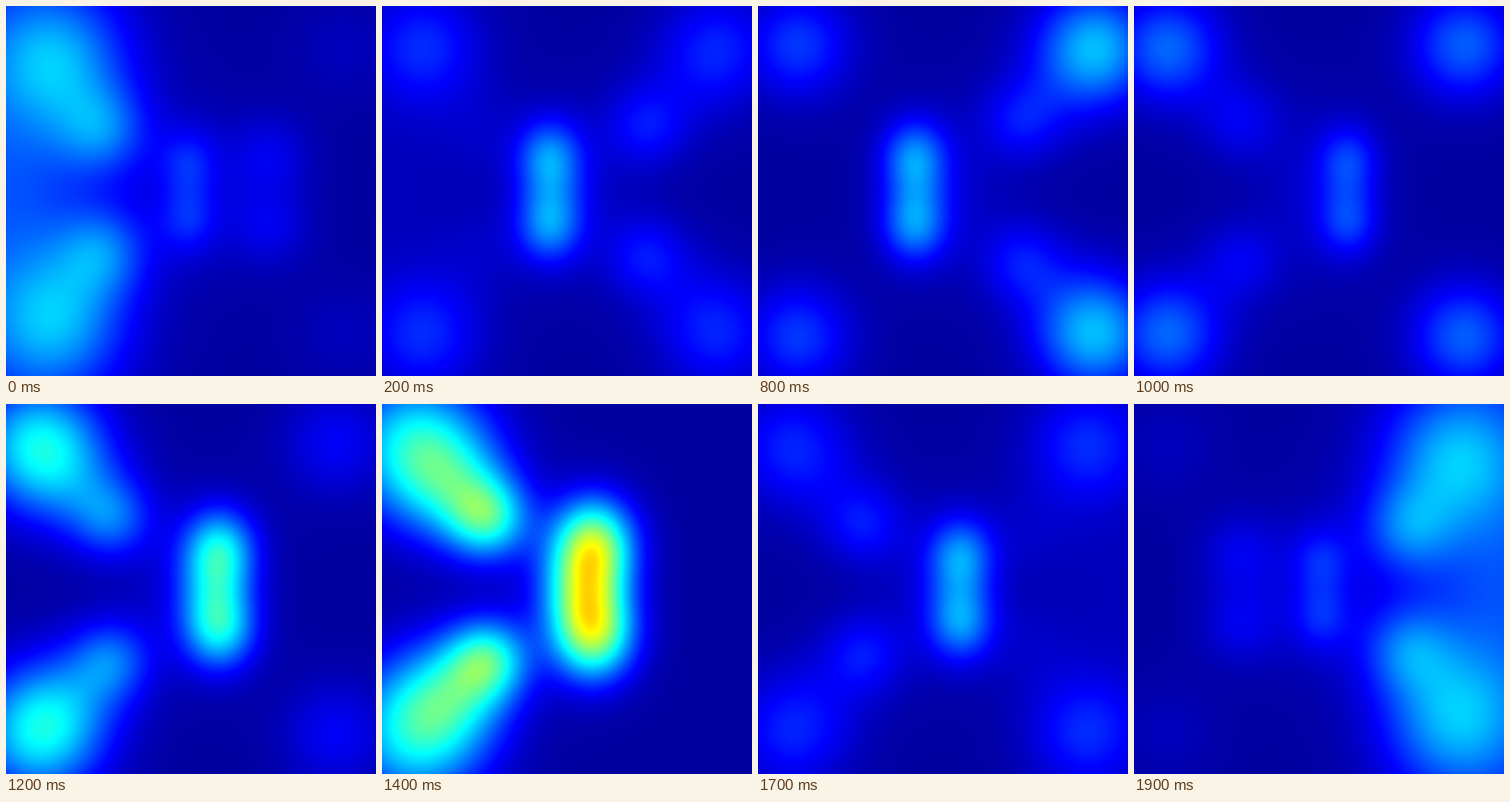
A matplotlib script that plays this animation: 376x376 px, repeating every 2000 ms.

```python
import numpy as np
import matplotlib.pyplot as plt
from matplotlib.animation import FuncAnimation

SIZE, DPI, FRAMES = 376, 100, 20
MID = (SIZE - 1) / 2
Y, X = np.mgrid[0:SIZE, 0:SIZE].astype(float)


def bell(x, centre, width):
    return np.exp(-((x - centre) / width) ** 2)


def lobe(height, x, y, wide, tall=None):
    """Soft round spot; y is measured from the mid line."""
    tall = tall or wide
    return (height * bell(X, x, wide * np.sqrt(2))
            * bell(Y, MID + y, tall * np.sqrt(2)))


def pair(height, x, y, wide, tall=None):
    return lobe(height, x, y, wide, tall) + lobe(height, x, -y, wide, tall)


def density(i):
    # The second half runs backwards as a mirror image
    if i >= FRAMES // 2:
        return density(FRAMES - 1 - i)[:, ::-1]

    fade = bell(i, 0, 1.5)      # opening glow on the left
    pulse = bell(i, 5, 2.93)    # bright core and arms
    late = bell(i, 6, 3.8)      # outer ends of the arms
    swing = np.cos(np.pi * i / (FRAMES / 2 - 0.5)) ** 2

    field = 0.03 + lobe(0.045, MID, 0, 45, 60)

    # Curved core
    x = 157 + 28 * np.exp(-i / 2.5)
    wide, tall = 20 + 9 * pulse, 24 + 9 * pulse
    field += pair(0.07 + 0.38 * pulse, x, 28 + 18 * pulse, wide, tall)
    field += lobe(0.27 * pulse ** 2, x + 10 * pulse, 0, wide, tall)

    # Diagonal arms on the right
    field += pair(0.07 + 0.25 * pulse ** 2, 268, 72 - 36 * fade, 29)
    field += pair(0.2 * pulse ** 2, 303, 105, 40)
    field += pair(0.36 * late, 342, 145, 36 + 14 * pulse)

    # Left corners and the glow between them
    field += pair(0.19 * swing, 40 + 15 * fade, 148 - 15 * fade, 38 + 11 * fade)
    field += pair(0.15 * fade, 98, 62, 32)
    field += lobe(0.17 * fade, 0, 0, 70, 200)
    return field


def rainbow(v):
    bands = [1.5 - np.abs(4 * v - centre) for centre in (3, 2, 1)]
    return np.clip(np.stack(bands, axis=-1), 0, 1)


fig = plt.figure(figsize=(SIZE / DPI, SIZE / DPI), dpi=DPI)
ax = fig.add_axes([0, 0, 1, 1])
ax.axis("off")
image = ax.imshow(rainbow(density(0)), interpolation="nearest", aspect="auto")


def draw(i):
    image.set_data(rainbow(density(i)))
    return [image]


anim = FuncAnimation(fig, draw, frames=FRAMES, interval=100,
                     init_func=lambda: draw(0), repeat=True, repeat_delay=0)
plt.show()
```
